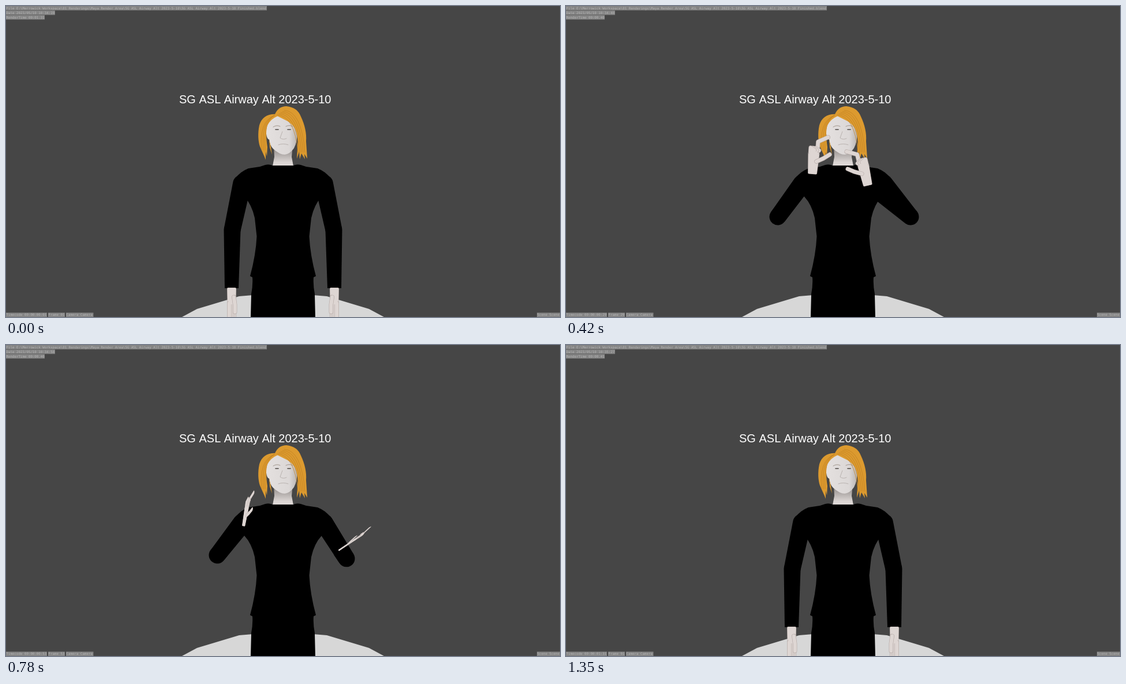
Recreate the animation shown at these times as an HTML page with a canvas. Size 960 px wide and 540 px high, loop 1.38 s.

```html
<!DOCTYPE html>
<html lang="en">
<head>
<meta charset="utf-8">
<title>Sign animation</title>
<style>
html, body { margin: 0; height: 100%; overflow: hidden; background: #464646; }
canvas { display: block; }
</style>
</head>
<body>
<canvas id="stage" width="960" height="540"></canvas>
<script>
const ctx = document.getElementById('stage').getContext('2d');
const STEP = 30, COUNT = 46;
const SHOULDER = { x: 409, y: 309, r: 16 }, ELBOW_R = 14.5, CUFF_R = 12;

// Hand forms; angles in degrees, positive towards the thumb:
// side, palm length, half width, finger spread, segment length,
// share the fingers are curled, their bend, bend of the index, thumb angle.
const rest = [1, 28, 5.5, 0, 15, 0, 0, 0, 8];
const open = [1, 33, 7, 8, 18, 0, 15, 15, 40];
const hook = [-1, 39, 8, 0, 19, .6, 120, 62, 62];
const point = [1, 23, 10, 14, 13, .25, -95, 5, 75];

const pose = (elbowX, elbowY, wristX, wristY, turn, form) =>
  [elbowX, elbowY, wristX, wristY, turn, ...form];

// Both arms are written for the viewer's left; the other one is mirrored.
const down = pose(392, 389, 391, 490, 0, rest);
const leftOut = pose(367, 366, 427, 291, 184, hook), leftIn = pose(369, 356, 439, 287, 195, hook);
const rightIn = pose(363, 366, 437, 311, 193, hook), rightOut = pose(364, 361, 416, 289, 186, hook);

const left = [
  [0, down],
  [120, pose(381, 381, 344, 477, 48, open)],
  [390, leftOut], [420, leftOut], [660, leftIn], [720, leftIn],
  [900, pose(360, 383, 357, 367, 180, point)],
  [1050, pose(389, 382, 352, 478, 30, rest)],
  [1170, down], [1380, down]
];
const right = [
  [0, down],
  [120, pose(378, 385, 345, 475, 35, open)],
  [390, rightIn], [420, rightIn], [660, rightOut], [690, rightOut],
  [900, pose(378, 384, 339, 446, 41, open)],
  [1050, pose(390, 389, 385, 490, 3, rest)],
  [1140, down], [1380, down]
];

function poseAt(keys, t) {
  const i = keys.findIndex(k => k[0] > t);
  const [t0, a] = keys[i - 1], [t1, b] = keys[i];
  return a.map((v, j) => v + (b[j] - v) * (t - t0) / (t1 - t0));
}

function fill(color, path) {
  ctx.fillStyle = color;
  ctx.fill(new Path2D(path));
}

function line(color, width, path) {
  ctx.strokeStyle = color;
  ctx.lineWidth = width;
  ctx.stroke(new Path2D(path));
}

function bothSides(draw) {
  draw(0);
  ctx.save();
  ctx.translate(960, 0);
  ctx.scale(-1, 1);
  draw(1);
  ctx.restore();
}

// A tapered limb, round where it starts and flat where it ends.
function limb(x0, y0, r0, x1, y1, r1) {
  const a = Math.atan2(y1 - y0, x1 - x0) + Math.PI / 2;
  const c = Math.cos(a), s = Math.sin(a);
  ctx.fillStyle = '#000';
  ctx.beginPath();
  ctx.arc(x0, y0, r0, a, a + Math.PI);
  ctx.lineTo(x1 - r1 * c, y1 - r1 * s);
  ctx.lineTo(x1 + r1 * c, y1 + r1 * s);
  ctx.fill();
}

function drawArm([ex, ey, wx, wy]) {
  limb(SHOULDER.x, SHOULDER.y, SHOULDER.r, ex, ey, ELBOW_R);
  limb(ex, ey, ELBOW_R, wx, wy, CUFF_R);
}

function finger(x, y, length, angle, bend) {
  let path = `M${x} ${y}`;
  for (const deg of [angle, angle + bend]) {
    const a = deg * Math.PI / 180;
    x += length * Math.sin(a);
    y += length * Math.cos(a);
    path += `L${x} ${y}`;
  }
  line('#b5aaa7', 7.5, path);
  line('#ded6d3', 6.2, path);
}

function drawHand([, , wx, wy, turn, side, palm, half, spread, reach, curl, fold, bend, thumb]) {
  ctx.save();
  ctx.translate(wx, wy);
  ctx.rotate(turn * Math.PI / 180);
  ctx.scale(side || .01, 1);
  const shape = `M-6 1H6L${half} ${palm - 4}L${half - 3} ${palm}H${3 - half}L${-half} ${palm - 4}Z`;
  line('#b5aaa7', 4, shape);
  line('#ded6d3', 3, shape);
  for (let i = 3; i >= 0; i--) {
    const k = i / 1.5 - 1, isIndex = i === 3;
    finger(half * .75 * k, palm - 2, isIndex ? reach : reach * (1 - curl),
      1.5 * k * spread, isIndex ? bend : fold);
  }
  fill('#ded6d3', shape);
  finger(half * .7, palm * .55, 13, thumb, -8);
  ctx.restore();
}

function drawHead() {
  const neck = ctx.createLinearGradient(0, 246, 0, 272);
  neck.addColorStop(0, '#8f8a88');
  neck.addColorStop(1, '#ddd7d5');
  fill(neck, 'M464 240L465 262L462 278H498L495 262L497 240Z');
  const skin = ctx.createLinearGradient(455, 0, 506, 0);
  skin.addColorStop(0, '#e3dfde');
  skin.addColorStop(.7, '#dcd8d7');
  skin.addColorStop(1, '#b5b0ae');
  fill(skin, 'M470 188C455 193 450 208 451 222Q452 231 456 232Q457 242 463 248Q474 258 483 258Q492 257 499 247Q505 236 505 218Q503 199 486 190Z');
  line('#a3978e', 1, 'M463 210Q469 206 475 209M485 209Q491 206 497 209');
  line('#4a4441', 1.6, 'M467 214.5H472M488 214.5H493');
  line('#b9b2af', 1, 'M479 218L475 229Q480 233 486 230M472 241Q480 238 489 241');

  fill('#dc9a2f', 'M471 188C454 186 443 193 439 207C436 221 437 235 440 244L448 262L450 267L450 253L452 261L453 245Q449 218 453 207Q459 196 471 191ZM456 231L459 245L461 258L457 246Z');
  fill('#dc9a2f', 'M466 188Q472 174 486 174Q505 176 511 192C518 207 521 221 520 235L522 265L517 257L518 266L512 256L509 266L508 253L504 265L505 246Q507 225 501 213Q494 202 482 197L470 191Z');
  for (let i = 0; i < 5; i++) {
    line('#bd7f22', .7, `M${470 + 3 * i} ${189 - 2 * i}Q${500 + 3 * i} ${190 - 2 * i} ${506 + 3 * i} 254`);
    if (i < 3) line('#bd7f22', .7, `M465 190Q${438 + 4 * i} 200 ${443 + 3 * i} 250`);
  }
}

function drawBody() {
  fill('#000', 'M481 277H462Q456 274 449 276L440 279L420 282Q405 288 398 299L394 314L413 331Q426 345 431 368L434.5 400Q433 432 423 469L427 471Q428 485 425 500L424 541H481Z');
}

function label(text, x, y, width) {
  ctx.fillStyle = '#848484';
  ctx.fillRect(x, y, width, 7.5);
  ctx.fillStyle = '#b5b5b5';
  ctx.fillText(text, x + .5, y + 5.8);
}

function drawLabels(n) {
  const two = v => String(v).padStart(2, '0');
  const frame = 1 + 2 * n;
  const clock = 19 + Math.round(n * 1.5);
  const shot = 'SG ASL Airway Alt 2023-5-10';
  ctx.fontKerning = 'none';
  ctx.font = '20px "Liberation Sans", Arial, sans-serif';
  ctx.fillStyle = '#fff';
  ctx.fillText(shot, 300, 169);
  ctx.font = '5.8px "DejaVu Sans Mono", monospace';
  label(`File E:\\Merrowick Workspace\\01 Renderings\\Maya Render Area\\${shot}\\${shot} Finished.blend`, 0, 0, 452);
  label(`Date 2023/05/10 10:${34 + Math.floor(clock / 60)}:${two(clock % 60)}`, 0, 8, 85);
  label(`RenderTime 00:0${n ? '0.' + (38 + n * 7 % 4) : '1.31'}`, 0, 16, 67);
  label(`Timecode 00:00:${two(Math.floor(frame / 60))}:${two(frame % 60)}`, 0, 532.5, 71);
  label(`Frame ${two(frame)}`, 73, 532.5, 29);
  label('Camera Camera', 104, 532.5, 47.5);
  label('Scene Scene', 920, 532.5, 40);
}

function draw(now) {
  const n = Math.floor(now / STEP) % COUNT;
  const arms = [left, right].map(keys => poseAt(keys, n * STEP));
  ctx.lineJoin = ctx.lineCap = 'round';
  ctx.fillStyle = '#464646';
  ctx.fillRect(0, 0, 960, 540);
  bothSides(() => fill('#d7d7d7', 'M305 540L331 526L404 504L440 501H481V540Z'));
  drawHead();
  bothSides(drawBody);
  bothSides(i => drawArm(arms[i]));
  bothSides(i => drawHand(arms[i]));
  drawLabels(n);
}

const start = performance.now();
function tick() {
  draw(performance.now() - start);
  requestAnimationFrame(tick);
}
tick();
</script>
</body>
</html>
```
